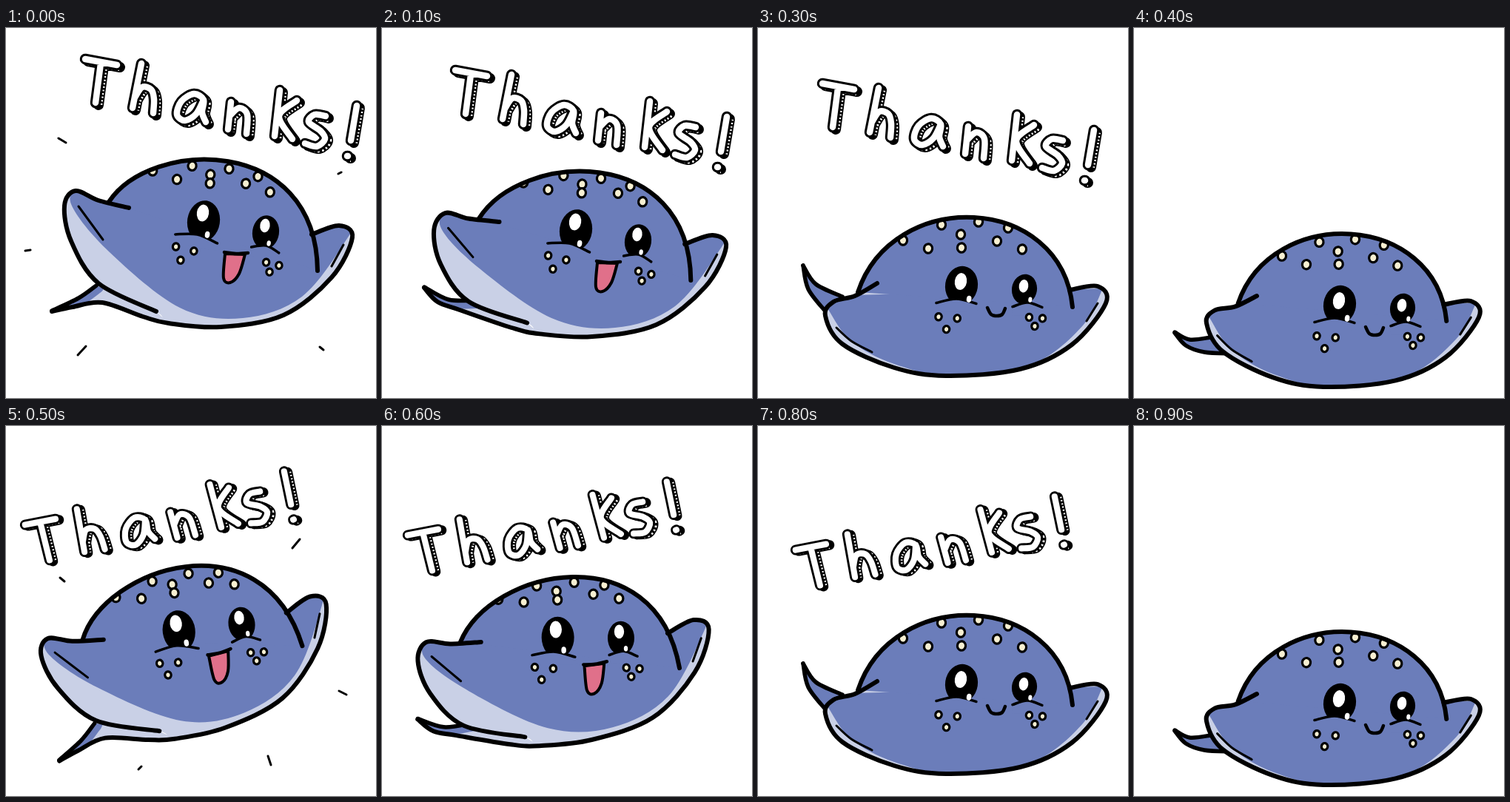
An HTML page with a canvas that plays this animation: 500x500 px, repeating every 1 s.

```html
<!DOCTYPE html>
<html>
<head>
<meta charset="utf-8">
<title>Thanks!</title>
<style>
html, body { margin: 0; width: 100%; height: 100%; overflow: hidden; background: #fff; }
canvas { display: block; width: 500px; height: 500px; }
</style>
</head>
<body>
<canvas id="stage" width="500" height="500"></canvas>
<script>
const ctx = document.getElementById('stage').getContext('2d');
const BLUE = '#6b7dba', PALE = '#c9d0e6', CREAM = '#f8f0d2', PINK = '#e0708a', INK = '#000';
const rad = deg => deg * Math.PI / 180;

// Flat x,y lists are handled pair by pair
const pairs = list => list.flatMap((v, i) => i % 2 ? [] : [[v, list[i + 1]]]);
const mapPairs = (list, fn) => pairs(list).flatMap(([x, y]) => fn(x, y));

// Smooth curve through the given points
function curve(list, path = new Path2D()) {
  const pts = pairs(list), at = i => pts[Math.max(0, Math.min(pts.length - 1, i))];
  path.moveTo(...pts[0]);
  for (let i = 0; i < pts.length - 1; i++) {
    const [a, b, c, d] = [at(i - 1), at(i), at(i + 1), at(i + 2)];
    path.bezierCurveTo(b[0] + (c[0] - a[0]) / 6, b[1] + (c[1] - a[1]) / 6,
      c[0] - (d[0] - b[0]) / 6, c[1] - (d[1] - b[1]) / 6, ...c);
  }
  return path;
}
function arch([x, y, ...rest]) {
  const p = new Path2D();
  p.moveTo(x, y);
  p.bezierCurveTo(...rest);
  return p;
}
function fill(path, color) { ctx.fillStyle = color; ctx.fill(path); }
function line(path, width, color = INK) {
  ctx.lineWidth = width;
  ctx.strokeStyle = color;
  ctx.stroke(path);
}
function oval(x, y, rx, ry, color) {
  const p = new Path2D();
  p.ellipse(x, y, rx, ry, 0.15, 0, 7);
  fill(p, color);
  return p;
}
const spot = (x, y, r) => line(oval(x, y, r, r * 1.1, CREAM), 3.2);
function within(path, paint) {
  ctx.save();
  ctx.clip(path);
  paint();
  ctx.restore();
}
// Turn by deg around (px, py), moving that point to (x, y)
function turn(deg, px, py, x, y, scale = 1) {
  ctx.translate(x, y);
  ctx.rotate(rad(deg));
  ctx.scale(scale, scale);
  ctx.translate(-px, -py);
}

// Squeeze and shift a body; "drop" lowers the left fin most
const warp = (sx, dx, sy, dy, drop) => (x, y) =>
  [sx * x + dx, sy * y + dy + drop * (Math.max(0, 270 - x) / 200) ** 2];
const still = warp(1, 0, 1, 0, 0);

// left and bottom outline the wings, belly parts blue from pale
const raised = {
  left: [166,243, 125,233, 94,220, 79,240, 88,288, 125,345, 203,383],
  bottom: [220,399, 290,404, 375,388, 440,337, 468,283, 450,267, 413,279],
  dome: [139,235, 195,150, 419,143, 421,328],
  belly: [100,205, 88,238, 140,303, 235,378, 320,392, 400,363, 462,283, 475,250],
  folds: [[98,241, 131,286], [456,293, 440,322]],
  trailing: true
};
const flat = {
  left: [157,318, 127,335, 98,343, 87,362, 110,400],
  bottom: [180,432, 250,443, 350,434, 420,401, 466,345, 455,322, 417,327],
  dome: [131,330, 178,188, 406,196, 421,350],
  belly: [84,335, 92,355, 122,396, 180,427, 270,446, 370,426, 435,375, 462,325],
  folds: [[102,378, 122,396, 150,411], [455,345, 440,369]]
};

const dots = [192,260, 226,271, 244,239, 270,252, 271,270, 294,235, 319,261, 334,243, 353,272];
// Seen from further below: rows closer together, leaning right
const tiltedDots = mapPairs(dots, (x, y) => {
  const u = x - 270, v = (y - 255) * 0.65, a = rad(7.5);
  return [276 + u * Math.cos(a) - v * Math.sin(a), 200 + u * Math.sin(a) + v * Math.cos(a)];
});

// eyes: x, y, radius, cheek shift, cheek half width; freckles: x, y, radius
const happy = {
  dots: tiltedDots, lean: 12, height: 1.27, glint: -0.5, spark: 0.23,
  eyes: [[267,261, 22, -9, 29], [351,276, 18, 0, 19]],
  freckles: [[240,303, 14], [359,322, 10]],
  mouth: [296,305, 294,338, 303,344, 315,332, 323,306]
};
const calm = {
  dots, lean: 1, height: 1.2, glint: -0.25, spark: 0.46,
  eyes: [[271,321, 22, -7, 27], [356,326, 17, 4, 20]],
  freckles: [[252,369, 14], [371,368, 10]],
  smile: [306,351, 311,360, 319,362, 326,360, 330,352]
};

function drawFace(f) {
  for (const [x, y, r, shift, w] of f.eyes) {
    oval(x, y, r, r * f.height, INK);
    ctx.save();
    ctx.translate(x + shift, y + 20);
    ctx.rotate(rad(f.lean));
    const cheek = curve([-w, 4, 0, -2, w, 4]);
    fill(curve([-w, 4, 0, -2, w, 4, w, 14, -w, 16]), BLUE);
    line(cheek, 3.5);
    ctx.restore();
    oval(x - 1, y + r * f.glint, r * 0.37, r * 0.52, '#fff');
    oval(x + r * f.spark, y + r * 0.83, r * 0.15, r * 0.21, '#fff');
  }
  for (const [x, y, r] of f.freckles)
    for (const deg of [-150, -20, 95])
      spot(x + r * Math.cos(rad(deg + f.lean)), y + 0.8 * r * Math.sin(rad(deg + f.lean)), 4.2);
  if (f.smile) return line(curve(f.smile), 4.5);
  const mouth = curve(f.mouth);
  mouth.closePath();
  fill(mouth, PINK);
  line(mouth, 4);
  line(curve([295,303, 311,305, 327,304]), 4.5);
}

function drawTail(top, low, left, bottom, trailing) {
  const tail = curve(top);
  const edge = [...pairs(low), bottom.slice(0, 2), left.slice(-2)].reverse();
  edge.forEach(p => tail.lineTo(...p));
  fill(tail, trailing ? PALE : BLUE);
  if (trailing) within(tail, () => line(curve(top), 22, BLUE));
  line(curve(top), 5.5);
  if (!trailing) line(curve(low), 5.5);
}

function drawBody({ shape, face, bend = still, look: [dx, dy] = [0, 0], top, low }) {
  const bent = list => mapPairs(list, bend);
  const left = bent(shape.left), bottom = bent(shape.bottom);
  const wing = curve([...left, ...bottom]), dome = arch(bent(shape.dome));
  drawTail(top, low, left, bottom, shape.trailing);

  fill(wing, PALE);
  within(wing, () => fill(curve(bent(shape.belly)), BLUE));
  fill(dome, BLUE);
  within(dome, () => pairs(bent(face.dots)).forEach(([x, y]) => spot(x, y, 5.6)));
  line(dome, 6);
  if (shape.trailing) {
    line(curve(left), 6);
    line(curve([...low, ...bottom]), 6);
  } else line(wing, 6);
  shape.folds.forEach(f => line(curve(bent(f)), 3));

  ctx.save();
  ctx.translate(dx, dy);
  drawFace(face);
  ctx.restore();
}

const letters = new Path2D();
[
  [107,42, 150,50], [128,48, 121,101],
  [183,48, 171,108], [174,94, 184,80, 196,83, 200,96, 199,115],
  [270,127, 265,114, 267,97, 254,89, 237,99, 231,117, 242,125, 257,116, 267,97],
  [304,100, 300,137], [302,119, 315,108, 326,117, 325,143],
  [370,84, 363,146], [393,98, 369,119, 387,150],
  [432,119, 417,117, 409,127, 425,139, 431,150, 420,160, 404,156],
  [474,105, 466,152], [461,173, 462,173]
].forEach(p => curve(p, letters));

function drawText([dx, dy], tilted) {
  ctx.save();
  ctx.translate(dx, dy);
  if (tilted) turn(-21.4, 128, 72, 55, 153, 0.96);
  // Hatched shadow, then the white letters
  ctx.save();
  ctx.translate(4, 3);
  line(letters, 14);
  ctx.lineCap = 'butt';
  ctx.setLineDash([2, 2.6]);
  line(letters, 10.5, '#fff');
  ctx.restore();
  line(letters, 14.5);
  line(letters, 8.5, '#fff');
  ctx.restore();
}

const glide = { shape: raised, face: happy, top: [62,382, 98,365, 122,348], low: [62,383, 90,377, 130,371, 185,390] };
const sink = {
  shape: raised, face: happy, bend: warp(1.015, -10, 1, 13, 22), look: [-5, 12],
  top: [57,350, 90,367, 128,368], low: [57,351, 75,370, 105,381, 175,405]
};
const rest = { shape: flat, face: calm, top: [57,294, 74,319, 110,336], low: [57,294, 64,326, 88,357] };
const crouch = {
  shape: flat, face: calm, bend: warp(0.971, 13.5, 0.9585, 60.4, -10), look: [7, 53],
  top: [55,411, 75,421, 104,418], low: [55,412, 70,429, 95,438, 132,440]
};

// One entry per 100 ms; each tick is x, y, dx, dy
const falling = [0, 0, 0, 4, 27];
const steps = [
  { pose: glide, text: [0, 0],
    ticks: [[71,149, 10,6], [449,197, 4,-2], [26,301, 7,-1], [97,442, 11,-12], [424,431, 5,4]] },
  { pose: sink, text: [-8, 15] },
  { pose: rest, text: [-16, 26] },
  { pose: rest, text: [-20, 33], turn: falling },
  { pose: crouch },
  { pose: glide, text: [0, 0], tilted: true, turn: [-16.6, 267, 262, 234, 278],
    ticks: [[73,205, 6,5], [387,165, 10,-12], [450,358, 10,5], [179,464, 4,-4], [354,446, 4,12]] },
  { pose: sink, text: [9, 14], tilted: true, turn: [-9.5, 260, 275, 236, 288] },
  { pose: rest, text: [19, 26], tilted: true, turn: [-2.5, 270, 320, 245, 316] },
  { pose: rest, text: [25, 34], tilted: true, turn: falling },
  { pose: crouch }
];

function draw() {
  const s = steps[Math.floor(performance.now() / 100) % steps.length];
  ctx.fillStyle = '#fff';
  ctx.fillRect(0, 0, 500, 500);
  ctx.lineCap = ctx.lineJoin = 'round';
  ctx.save();
  if (s.turn) turn(...s.turn);
  drawBody(s.pose);
  ctx.restore();
  if (s.text) drawText(s.text, s.tilted);
  for (const [x, y, dx, dy] of s.ticks || []) line(curve([x, y, x + dx, y + dy]), 3);
  requestAnimationFrame(draw);
}
draw();
</script>
</body>
</html>
```
